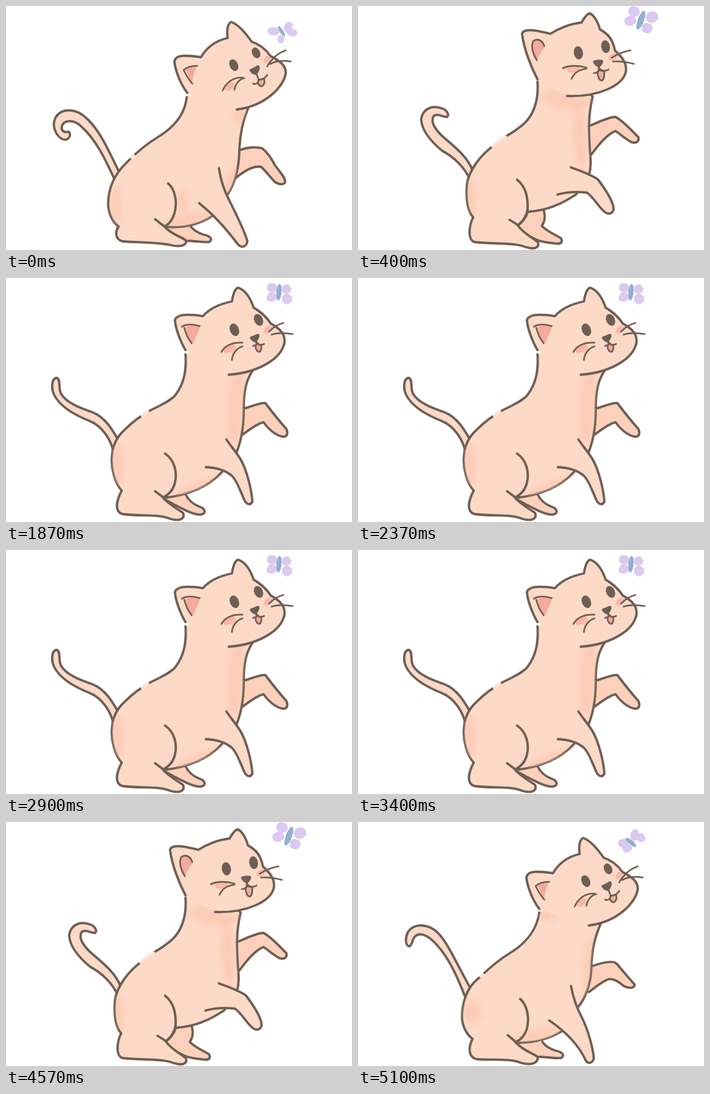
Recreate the animation shown at these times as an HTML page. Size 559 by 396 pixels, loop 5.21 s.

```html
<!DOCTYPE html>
<html lang="en">
<head>
<meta charset="utf-8">
<title>Cat and butterfly</title>
<style>
html, body { margin: 0; width: 100%; height: 100%; overflow: hidden; background: #fff; }
svg { display: block; width: 100vw; height: 100vh; }
.skin { fill: #fdd9c7; }
.far { fill: #fcd0ba; }
.line { stroke: #6d5f54; stroke-width: 3.8; stroke-linecap: round; stroke-linejoin: round; }
.open { fill: none; }
.thin { stroke-width: 2.7; }
.gap { stroke: #fde3d6; stroke-width: 5; fill: none; }
.pink { fill: #f3aa9c; }
.dark { fill: #6d5f54; }
.soft { fill: #fbbfa5; filter: url(#blur); }
.wing { fill: #dcc9f1; }
.bug { fill: #90b0d2; }
</style>
</head>
<body>
<svg id="stage" viewBox="0 0 559 396">
  <defs>
    <filter id="blur" x="-60%" y="-60%" width="220%" height="220%"><feGaussianBlur stdDeviation="4"/></filter>
    <clipPath id="inside"><path id="clip"/></clipPath>
  </defs>
  <g id="butterfly"></g>
  <path id="tail" class="skin line"/>
  <path id="farPaw" class="far line"/>
  <path id="farFoot" class="far line"/>
  <path id="body" class="skin line"/>
  <g id="shade" clip-path="url(#inside)"></g>
  <path id="thigh" class="open line"/>
  <path id="gap" class="gap"/>
  <path id="paw" class="skin line"/>
  <g id="headGroup">
    <path id="head" class="skin line"/>
    <path id="earFill" class="pink"/>
    <path id="earLine" class="open line thin"/>
    <g id="blush"></g>
    <g id="eyes"></g>
    <path id="tongue" class="pink line thin"/>
    <path id="mouth" class="open line thin"/>
    <path id="nose" class="dark"/>
    <path id="whiskers" class="open line thin"/>
  </g>
</svg>
<script>
const $ = id => document.getElementById(id);

// Ellipses are [cx, cy, rx, ry, angle].
const crouch = {
  wings: [[432, 41, 9.5, 6.5, 10], [444, 54, 5.5, 6.5, -10], [456, 34, 6.5, 9, 25], [462, 43, 9, 6, 10]],
  bug: [[445, 41, 3, 10, -32]],
  tail: 'M184 272C166 235 152 203 132 184C115 166 90 164 80 181C72 197 84 217 96 217C104 216 105 206 101 204C95 206 89 203 90 196C93 184 110 184 121 195C146 217 161 250 177 285',
  farPaw: 'M377 234C390 229 405 228 414 231C423 238 428 247 435 259C442 269 451 278 451 285C450 291 440 290 434 285C426 277 420 268 412 261C398 259 385 268 370 280',
  farFoot: 'M256 358C268 372 284 374 291 381C305 381 318 384 328 383C335 379 330 373 319 371C310 368 302 363 298 357',
  body: 'M292 148C289 175 272 196 248 211C230 222 213 235 195 254C172 276 165 300 165 322C166 340 174 352 182 358C176 366 176 378 188 382C215 384 245 383 266 388C282 392 292 388 291 381C284 374 268 372 256 358C285 361 310 356 333 341L358 306C372 285 377 255 377 233C378 210 381 190 391 166L330 120',
  thigh: 'M262 288C274 298 277 320 272 337C268 350 262 355 256 358L241 346',
  gap: 'M202 248L208 242',
  paw: 'M344 263C347 285 354 303 362 318C374 342 386 366 390 382C388 392 380 393 374 386C356 362 335 338 312 320',
  head: 'M293 141C284 130 274 108 272 90C274 78 292 80 315 83C325 66 340 56 358 52C356 38 359 27 364 26C375 30 388 45 397 58C412 63 421 72 427 81C440 88 452 95 452 108C450 130 420 162 373 168',
  earFill: 'M290 103C297 99 303 98 309 97C303 108 301 118 301 126Z',
  earLine: 'M309 97C301 97 293 98 287 104C291 112 296 120 301 126',
  blush: [[361, 130, 10, 6, -35], [422, 87, 7, 5, -50]],
  eyes: [[368, 96, 6.8, 10, -25], [404, 76, 6.5, 9.2, -25]],
  nose: 'M393 103C399 101 404 97 408 96C412 99 409 108 404 112C399 111 394 108 393 103Z',
  mouth: 'M399 126C404 128 409 125 408 119L405 111M408 119C413 120 418 118 422 112',
  tongue: 'M407 124C407 128 411 131 414 130C418 127 418 122 417 118L408 120Z',
  whiskers: 'M350 137C356 124 367 116 382 116M369 136C371 126 377 119 385 117M422 98C429 86 440 76 452 72M427 94C435 89 446 88 460 90',
  shade: [[178, 325, 8, 30, 0], [295, 347, 42, 10, -10], [285, 317, 8, 20, 0], [366, 285, 9, 24, 15], [378, 178, 14, 9, -30]]
};

const settle = {
  ...crouch,
  wings: [[429, 35, 9, 7.5, 10], [435, 43, 8, 6, -20], [447, 21, 7, 9.5, 15], [456, 25, 8.5, 7, 30]],
  bug: [[441, 33, 3.5, 11, -50]],
  tail: 'M183 272C162 236 148 201 131 182C116 165 92 163 81 178C76 188 76 200 83 202C88 200 87 191 92 186C102 176 117 188 127 199C149 223 163 257 177 294',
  farPaw: 'M378 234C395 228 412 224 418 230C428 242 440 256 447 264C446 271 436 270 429 266C420 258 412 254 405 255C392 260 384 268 373 276',
  farFoot: 'M255 358C268 372 282 375 290 381C305 381 318 384 328 383C335 379 330 373 319 371C310 368 302 363 298 357',
  body: 'M293 147C289 174 272 196 248 211C230 222 213 236 198 251C174 268 168 296 168 318C169 334 177 346 185 352C178 366 178 382 192 385C215 387 245 383 264 391C282 396 292 390 290 381C282 375 268 372 255 358C285 359 308 353 330 339L354 302C370 285 377 255 377 233C378 210 381 190 393 163L330 120',
  thigh: 'M262 287C274 298 277 318 273 335C269 349 262 354 255 357L242 346',
  gap: 'M197 252L203 246',
  paw: 'M344 266C348 287 354 303 362 318C372 338 380 368 381 384C378 393 371 392 368 387C358 365 338 342 309 322',
  shade: [[184, 309, 15, 18, 0], [292, 346, 40, 10, -10], [372, 240, 7, 52, 4], [305, 152, 12, 10, 0]]
};

const lift = {
  wings: [[430, 16, 8.5, 8, 20], [429, 31, 8.5, 7.5, -20], [453, 18, 8, 7.5, -30], [454, 34, 8.5, 8.5, 20]],
  bug: [[441, 23, 4.2, 13.5, 5]],
  tail: 'M183 266C172 246 160 226 140 218C120 211 98 203 89 188C84 178 89 165 82 162C73 163 73 180 78 190C87 208 110 222 135 232C155 240 170 262 174 284',
  farPaw: 'M384 212C398 208 412 202 419 203C428 215 444 235 453 245C457 255 452 259 445 257C436 255 424 246 416 234C405 237 393 246 380 256',
  farFoot: 'M254 357C262 363 272 368 282 373C294 379 304 384 314 384C325 383 322 374 312 371C302 367 294 359 290 351',
  body: 'M290 124C292 150 287 174 272 192C260 203 246 208 231 216C214 226 203 235 192 246C174 262 170 282 171 300C172 320 180 338 187 345C179 360 174 379 188 383C215 387 245 383 263 390C280 396 290 391 286 381C278 376 262 366 254 357C300 352 328 337 348 316L372 284C380 265 384 245 384 214C384 195 385 170 398 151L340 105',
  thigh: 'M257 285C272 295 277 315 273 332C270 345 262 352 254 356L241 346',
  gap: 'M218 224L231 216',
  paw: 'M356 262C364 274 374 285 380 296C390 315 397 345 398 363C395 370 388 367 385 360C378 345 374 330 365 321C353 311 340 308 323 307',
  head: 'M290 117C283 106 273 80 273 68C277 57 300 59 318 62C328 50 346 42 365 38C367 25 371 15 376 16C386 20 394 30 400 48C412 55 422 65 428 74C442 82 451 90 450 104C446 130 410 153 360 157',
  earFill: 'M289 80C297 77 306 77 314 79C309 92 305 102 300 107C295 99 291 90 289 80Z',
  earLine: 'M313 78C302 75 291 75 284 79M288 81C291 92 295 100 300 106',
  blush: [[361, 115, 11, 6, -25], [423, 84, 8, 5, -45]],
  eyes: [[369, 84, 7.3, 10.5, -22], [408, 68, 7, 10, -24]],
  nose: 'M394 96C399 94 405 90 409 91C411 95 407 102 403 105C398 103 394 100 394 96Z',
  mouth: 'M399 110C404 110 406 107 404 103C407 108 412 110 417 107',
  tongue: 'M403 110C403 116 406 120 410 120C413 117 413 112 412 109L405 107Z',
  whiskers: 'M348 120C354 109 367 104 382 105M365 133C366 123 372 114 382 111M425 87C432 80 439 75 448 73M429 92C440 88 452 89 463 91',
  shade: [[180, 305, 10, 34, 0], [371, 205, 13, 62, 4], [310, 342, 40, 9, -22]]
};

const rise = {
  wings: [[446, 9, 9.5, 8.5, 20], [440, 24, 10, 8, -10], [475, 18, 10.5, 9, -15], [467, 36, 9, 8.5, 20]],
  bug: [[457, 23, 5, 16, 20]],
  tail: 'M184 264C176 245 160 232 143 217C128 205 116 190 122 179C127 173 136 180 144 180C148 176 143 168 135 166C118 160 104 168 102 184C103 202 118 220 136 235C155 245 172 262 180 280',
  farPaw: 'M375 194C390 188 405 180 416 180C428 186 444 204 453 213C455 221 448 223 442 221C432 216 424 208 416 203C402 208 388 226 377 241',
  farFoot: 'M300 331C304 345 300 352 297 357C306 366 320 372 328 377C332 385 326 387 316 385C306 384 298 383 290 380C276 374 264 366 258 356L274 334',
  body: 'M290 123C292 150 285 172 273 186C262 198 250 205 240 211C232 217 225 222 217 228C195 245 178 270 176 290C174 315 178 333 186 343C178 360 178 380 188 383C215 387 250 383 270 391C285 396 293 392 291 384C283 376 268 370 258 356C266 350 272 343 274 334C305 332 328 322 352 306L373 275C377 262 376 250 375 238C373 210 371 180 379 147L330 95',
  thigh: 'M257 282C270 292 275 310 274 330C272 343 266 350 259 356L245 347',
  gap: 'M216 229L240 211',
  paw: 'M344 262C360 268 378 274 388 282C400 298 413 318 413 330C410 340 402 338 396 332C386 322 380 310 370 303C355 301 340 301 322 306',
  head: 'M290 119C280 100 268 70 265 45C268 35 290 40 311 45C325 36 345 28 361 27C365 20 370 12 375 12C384 17 388 28 391 38C405 46 412 55 415 72C425 82 434 90 433 105C430 128 390 148 338 146',
  earFill: 'M284 57C292 54 299 58 302 66C298 72 293 79 289 87C283 77 281 66 284 57Z',
  earLine: 'M301 65C298 55 289 52 283 57C279 65 283 79 289 88',
  blush: [[348, 103, 11, 6, -5], [412, 83, 8, 5, -30]],
  eyes: [[356, 76, 7.4, 10.8, -8], [400, 66, 7, 10.5, -10]],
  nose: 'M380 89C385 87 391 86 396 88C397 92 393 98 389 100C384 98 379 93 380 89Z',
  mouth: 'M381 109C386 109 390 106 389 100C392 105 399 107 405 103',
  tongue: 'M387 107C387 114 390 121 394 121C398 119 398 112 398 106L390 104Z',
  whiskers: 'M331 101C341 96 356 96 369 100M345 118C349 109 357 103 369 102M410 84C420 77 430 74 440 72M412 90C425 89 435 91 446 94',
  shade: [[336, 152, 40, 15, 8], [359, 215, 11, 52, -3], [182, 312, 7, 28, 0]]
};

const reach = {
  ...rise,
  move: {
    butterfly: 'translate(-2 5) rotate(6 457 23)',
    headGroup: 'translate(-2 -2)',
    paw: 'rotate(-7 345 275)',
    farPaw: 'rotate(-5 376 215)',
    tail: 'rotate(4 180 270)'
  }
};

const poses = [crouch, settle, lift, rise, reach];
const order = [0, 1, 2, 3, 4, 3, 2, 1];
const starts = [0, 170, 300, 400, 530, 700, 800, 930, 1070, 1200,
  1330, 1470, 1570, 1730, 1870, 1970, 2100, 2270, 2370, 2500];
const HALF = 2600, LOOP = 5210;

const outlines = ['tail', 'farPaw', 'farFoot', 'body', 'thigh', 'gap', 'paw', 'head',
  'earFill', 'earLine', 'nose', 'mouth', 'tongue', 'whiskers'];
const movable = ['butterfly', 'headGroup', 'paw', 'farPaw', 'tail'];

const ovals = (list, cls, opacity = 1) => list.map(([x, y, rx, ry, a]) =>
  `<ellipse class="${cls}" opacity="${opacity}" rx="${rx}" ry="${ry}" transform="translate(${x} ${y}) rotate(${a})"/>`
).join('');

function draw(p) {
  for (const id of outlines) $(id).setAttribute('d', p[id]);
  for (const id of movable) $(id).setAttribute('transform', p.move?.[id] ?? '');
  $('clip').setAttribute('d', p.body);
  $('butterfly').innerHTML = ovals(p.wings, 'wing') + ovals(p.bug, 'bug');
  $('shade').innerHTML = ovals(p.shade, 'soft', .5);
  $('blush').innerHTML = ovals(p.blush, 'pink', .7);
  $('eyes').innerHTML = ovals(p.eyes, 'dark');
}

function poseAt(ms) {
  const t = ms % LOOP;
  const second = t >= HALF;
  const local = second ? t - HALF : t;
  const step = starts.filter(s => s <= local).length - 1 + (second ? starts.length : 0);
  return poses[order[step % order.length]];
}

let shown;
const origin = performance.now();
function tick() {
  const pose = poseAt(performance.now() - origin);
  if (pose !== shown) draw(shown = pose);
  requestAnimationFrame(tick);
}
tick();
</script>
</body>
</html>
```
